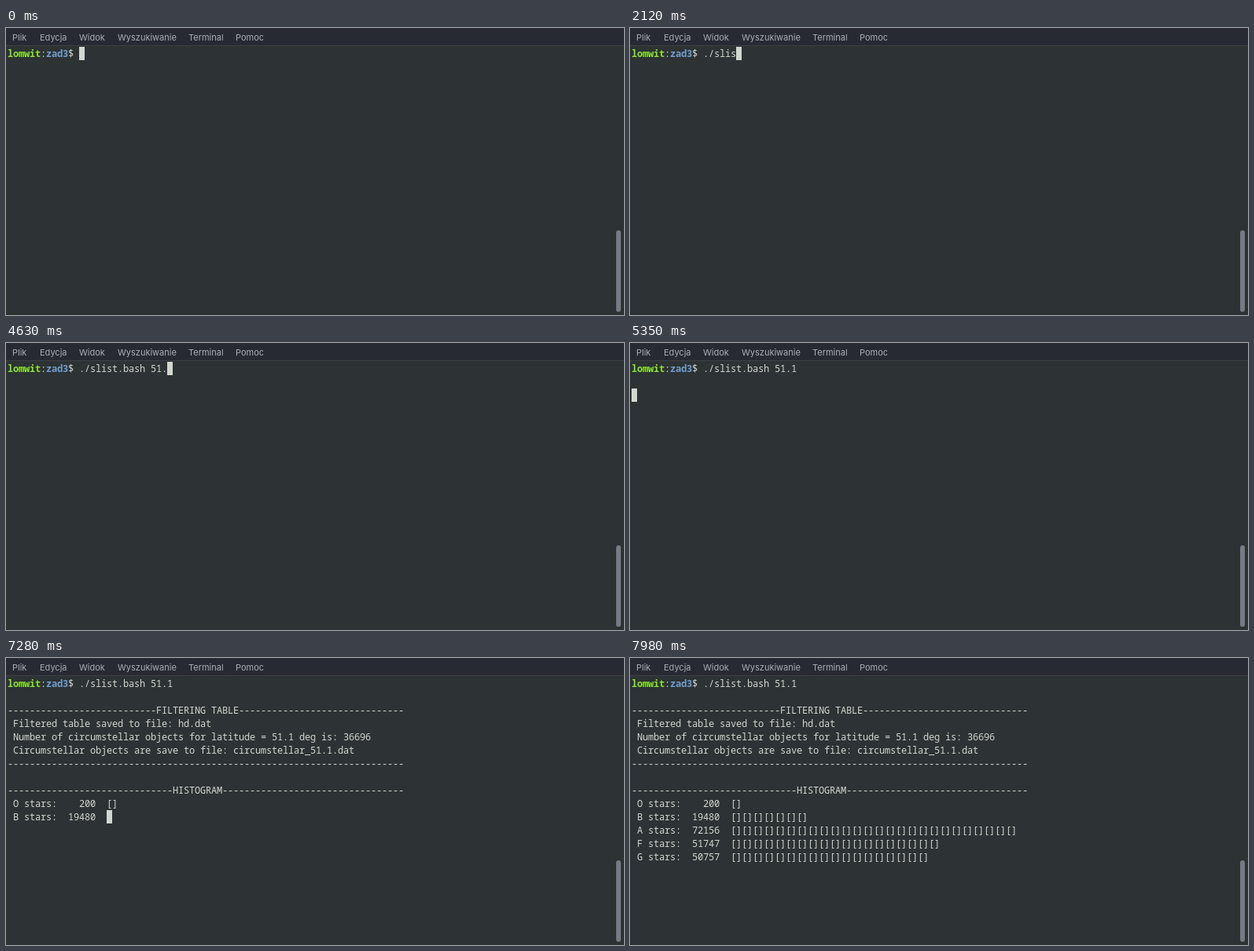
These frames come from a looping animation (786x366 px, 8000 ms). An HTML page:

```html
<!DOCTYPE html>
<html lang="pl">
<head>
<meta charset="utf-8">
<title>Terminal</title>
<style>
  html, body { margin: 0; width: 100%; height: 100%; overflow: hidden; background: #2d3234; }
  #menu {
    position: absolute; inset: 0 0 auto; height: 22px;
    background: #282a33; border-bottom: 1px solid #3d4143;
    font: 11px/24px Inter, sans-serif; color: #a9adb7;
  }
  #menu span { position: absolute; top: 0; }
  #screen {
    position: absolute; left: 2px; top: 24px; margin: 0;
    font: 12px/17px "Noto Sans Mono", monospace;
    letter-spacing: calc(7px - 1ch); white-space: pre; color: #d3d7cf;
  }
  .user { color: #8ae234; }
  .dir { color: #729fcf; }
  #cursor { position: absolute; width: 7px; height: 17px; background: #d3d7cf; }
  #scrollbar {
    position: absolute; left: 776px; top: 258px; width: 6px; height: 104px;
    border-radius: 3px; background: #757a84;
  }
</style>
</head>
<body>
<div id="menu"></div>
<pre id="screen"><b class="user">lomwit</b>:<b class="dir">zad3</b>$ <span id="output"></span></pre>
<div id="cursor"></div>
<div id="scrollbar"></div>
<script>
const LOOP = 8000;
const CELL = { w: 7, h: 17, left: 2, top: 24 };
const PROMPT = 'lomwit:zad3$ ';
const $ = id => document.getElementById(id);

const menu = { Plik: 8, Edycja: 43, Widok: 93, Wyszukiwanie: 142, Terminal: 232, Pomoc: 292 };
for (const [label, x] of Object.entries(menu)) {
  const item = document.createElement('span');
  item.textContent = label;
  item.style.left = x + 'px';
  $('menu').append(item);
}

const dashes = n => '-'.repeat(n);
const heading = (before, title, after) => dashes(before) + title + dashes(after) + '\n';
const count = (type, n) => ` ${type} stars:${String(n).padStart(7)}  `;
const bar = n => '[]'.repeat(n) + '\n';

// Each step appends text at a time in ms.
const steps = [
  [750, '.'], [830, '/'], [1700, 's'], [1840, 'l'], [1990, 'i'], [2120, 's'],
  [2350, 't'], [3010, '.'], [3330, 'b'], [3440, 'a'], [3540, 's'], [3680, 'h'],
  [4340, ' 5'], [4460, '1'], [4630, '.'], [4720, '1'], [5250, '\n'], [5350, '\n'],
  [6730, heading(27, 'FILTERING TABLE', 30) + ' Filtered table saved to file: hd.dat\n'],
  [6990, ' Number of circumstellar objects for latitude = 51.1 deg is: 36696\n' +
         ' Circumstellar objects are save to file: circumstellar_51.1.dat\n' +
         dashes(72) + '\n\n' + heading(30, 'HISTOGRAM', 33)],
  [7090, count('O', 200)], [7180, bar(1)],
  [7280, count('B', 19480)], [7380, bar(7)],
  [7480, count('A', 72156)], [7580, bar(26)],
  [7680, count('F', 51747)], [7780, bar(19)],
  [7880, count('G', 50757)], [7980, bar(18)],
];
const cursorHidden = [[3010, 4630], [7480, LOOP]];

let shown = null;
function draw(now) {
  const t = now % LOOP;
  const text = steps.filter(([at]) => at <= t).map(([, part]) => part).join('');
  if (text !== shown) {
    $('output').textContent = shown = text;
    const lines = (PROMPT + text).split('\n');
    const { style } = $('cursor');
    style.left = CELL.left + lines.at(-1).length * CELL.w + 'px';
    style.top = CELL.top + (lines.length - 1) * CELL.h + 'px';
  }
  const hidden = cursorHidden.some(([from, to]) => t >= from && t < to);
  $('cursor').style.visibility = hidden ? 'hidden' : 'visible';
}

const start = performance.now();
function tick() {
  draw(performance.now() - start);
  requestAnimationFrame(tick);
}
tick();
</script>
</body>
</html>
```
